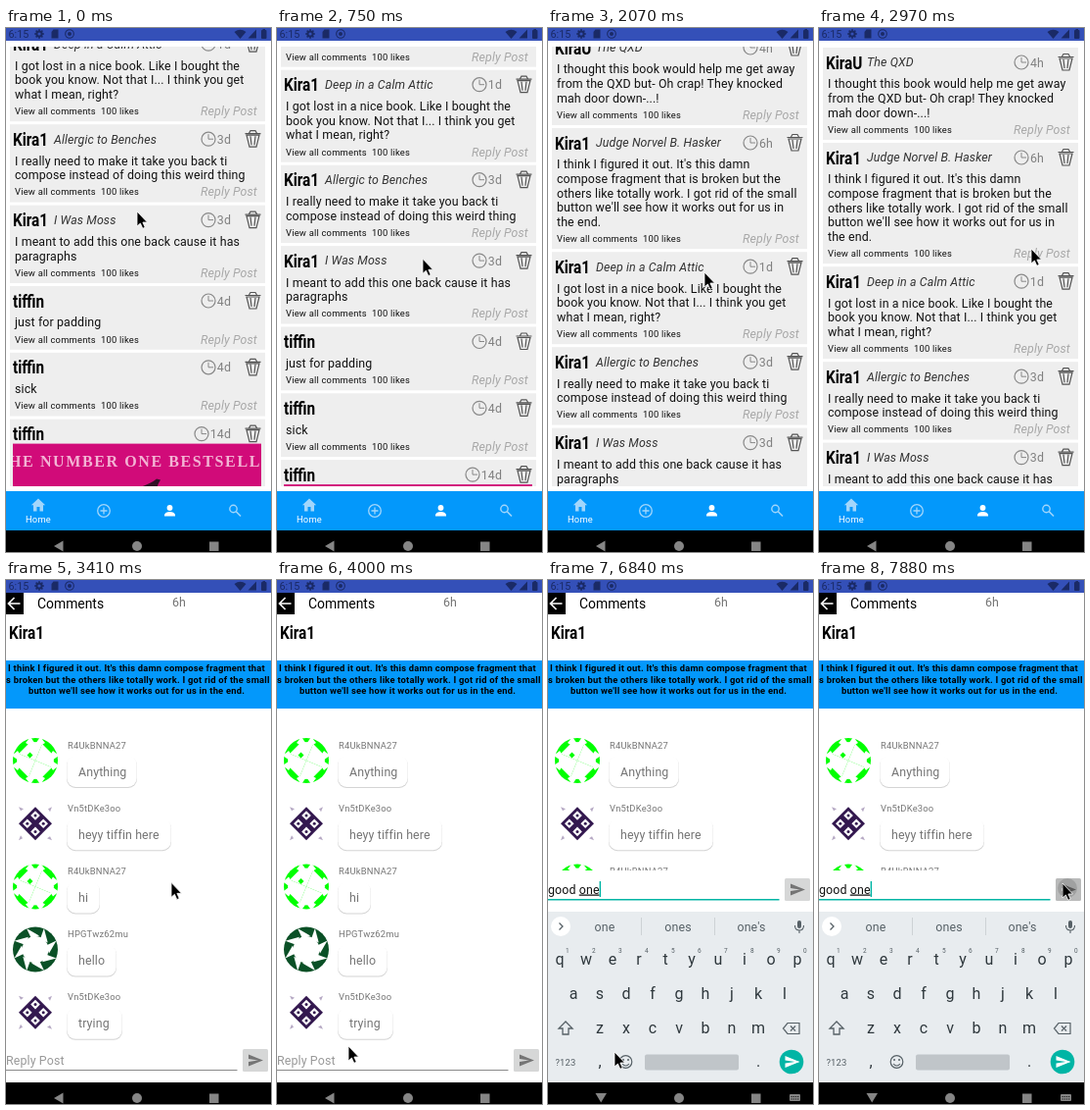
Recreate the animation shown at these times as an HTML page. Size 271 px wide and 534 px high, loop 8000 ms.

```html
<!DOCTYPE html>
<html lang="en">
<head>
<meta charset="utf-8">
<title>Feed and comments</title>
<style>
html, body { margin: 0; height: 100%; overflow: hidden; background: #fff }
svg { display: block; width: 100vw; height: 100vh }
text { font-family: Roboto, sans-serif; white-space: pre }
.body { font-size: 12.4px; letter-spacing: .12px }
.small { font-size: 9.4px; letter-spacing: .21px }
.name { font-size: 18px; font-weight: 700 }
.clock { font-size: 10.8px }
.bar { font-size: 13.9px }
.cover { font: 700 16px 'Liberation Serif', serif; letter-spacing: 1.6px }
.it { font-style: italic }
.bold { font-weight: 700 }
.mid { text-anchor: middle }
.end { text-anchor: end }
.key { font-size: 16px; text-anchor: middle }
.line { fill: none; stroke: currentColor }
</style>
</head>
<body>
<svg id="stage" viewBox="0 0 271 534"></svg>
<script>
const TICK = 148, LAST = 53, DURATION = 8000;
const BLUE = '#0398fb', TEAL = '#00b5a5', GRAY = '#757575';

const text = (x, y, s, cls = 'body', fill = '#111') =>
  `<text x="${x}" y="${y}" class="${cls}" fill="${fill}">${s}</text>`;
const rect = (x, y, w, h, fill, r = 0) =>
  `<rect x="${x}" y="${y}" width="${w}" height="${h}" rx="${r}" fill="${fill}"/>`;
const circle = (x, y, r, fill) => `<circle cx="${x}" cy="${y}" r="${r}" fill="${fill}"/>`;
const path = (d, fill) => `<path d="${d}" fill="${fill}"/>`;
const line = (d, color, w = 1) => `<path d="${d}" class="line" color="${color}" stroke-width="${w}"/>`;
const ring = (x, y, r, color, w = 1) =>
  `<circle cx="${x}" cy="${y}" r="${r}" class="line" color="${color}" stroke-width="${w}"/>`;
const at = (x, y, s, more = '') => `<g transform="translate(${x} ${y}) ${more}">${s}</g>`;
const group = (id, s, attrs = '') => `<g id="${id}" ${attrs}>${s}</g>`;
const clip = (id, x, y, w, h) => `<clipPath id="${id}"><rect x="${x}" y="${y}" width="${w}" height="${h}"/></clipPath>`;
const condensed = (x, y, s) => at(x, y, text(0, 0, s, 'name', '#000'), 'scale(.85 1)');
const spin = (count, s) => Array.from({ length: count }, (_, i) =>
  `<g transform="rotate(${i * 360 / count})">${s}</g>`).join('');
const magnifier = (x, y, color, w) =>
  at(x, y, ring(-1.5, -1.5, 3.7, color, w) + line('M1.3 1.3L6 6', color, w + .2));
const plane = (x, y, color) => at(x, y, path('M-7-6L8 0L-7 6V1.4L3 0L-7-1.4Z', color));

// Feed
const posts = [
  ['KiraU', 'The QXD', '4h', 'I thought this book would help me get away', 'from the QXD but- Oh crap! They knocked', 'mah door down-...!'],
  ['Kira1', 'Judge Norvel B. Hasker', '6h', "I think I figured it out. It's this damn", 'compose fragment that is broken but the',
    'others like totally work. I got rid of the small', "button we'll see how it works out for us in", 'the end.'],
  ['Kira1', 'Deep in a Calm Attic', '1d', 'I got lost in a nice book. Like I bought the', 'book you know. Not that I... I think you get', 'what I mean, right?'],
  ['Kira1', 'Allergic to Benches', '3d', 'I really need to make it take you back ti', 'compose instead of doing this weird thing'],
  ['Kira1', 'I Was Moss', '3d', 'I meant to add this one back cause it has', 'paragraphs'],
  ['tiffin', '', '4d', 'just for padding'],
  ['tiffin', '', '4d', 'sick'],
  ['tiffin', '', '14d'],
];
const trash = line('M-8-5.5H8M-4-6L-2.5-8.5H2.5L4-6M-6.5-4L-3.5 8H3.5L6.5-4ZM-2.5-3L-1.5 6M2.5-3L1.5 6', '#555', 1.2);

function post(y, [name, title, age, ...lines], height) {
  const clockX = age.length > 2 ? 200 : 207;
  let s = rect(4, y - 15, 261, height - 3, '#eee') + condensed(7, y + 6.5, name) +
    text(49, y + 4.3, title, 'body it', '#333') +
    ring(clockX, y, 7, '#888', 1.2) + line(`M${clockX} ${y - 5}v5h5`, '#888') +
    text(230, y + 4.5, age, 'body end', '#808080') + at(252.5, y, trash);
  if (!lines.length) {
    return s + rect(7, y + 10, 254, 90, '#d10b79') +
      `<g clip-path="url(#coverArea)">${text(3, y + 33.5, 'HE NUMBER ONE BESTSELLER', 'cover', '#f3b4d4')}</g>` +
      path(`M138 ${y + 54}q10-3 16-8l4 1q-4 6-4 12z`, '#321026');
  }
  lines.forEach((l, i) => s += text(9, y + 26.4 + 14.6 * i, l));
  const foot = y + height - 25.2;
  return s + text(9, foot, 'View all comments', 'small') + text(97, foot, '100 likes', 'small') +
    text(199, foot + 1, 'Reply Post', 'body it', '#a8a8a8');
}
let headY = 35;
const feedList = posts.map(p => {
  const height = p.length > 3 ? 53.2 + 14.6 * (p.length - 3) : 160;
  const s = post(headY, p, height);
  headY += height;
  return s;
}).join('');

const pale = '#a2d6fb';
const tabs = rect(0, 472, 271, 40, BLUE) +
  path('M33 479.500L25.800 486.300H28V492.500H31.500V488H34.500V492.500H38V486.300H40.200Z', pale) +
  text(33, 504, 'Home', 'small mid', '#fff') +
  ring(100, 492, 6.3, pale, 1.3) + line('M96.500 492h7M100 488.500v7', pale, 1.3) +
  circle(167.5, 489, 2.9, '#fff') + path('M162 497.500v-1.500q1-3 5.500-3t5.500 3v1.500z', '#fff') +
  magnifier(234, 491.5, pale, 1.4);

// Comments
const green = '#0f0', violet = '#33184f', forest = '#0a5026';
const avatars = {
  burst: circle(0, 0, 23, green) +
    spin(4, path('M0 0L-17-7L-7-17L0-19L7-17Z', '#fff') + path('M-10-18L-5-24L0-17L5-24L10-18L0-12Z', '#fff') +
      path('M5.500-8.500L8.500-5.500L5.500-2.500L2.500-5.500Z', green)),
  weave: path('M0-17L17 0L0 17L-17 0Z', violet) +
    spin(4, path('M0-13L4.800-8.200L0-3.400L-4.800-8.200Z', '#fff') + circle(0, -8.2, 1.5, violet) +
      path('M-17-17l5 2-3 2z', '#b6a9c4')),
  wheel: circle(0, 0, 23, forest) + circle(0, 0, 13.5, '#fff') +
    spin(8, path('M-9-21.500L4-14L-4-11Z', '#fff')),
};
const replies = [
  ['burst', 'R4UkBNNA27', 'Anything', 72], ['weave', 'Vn5tDKe3oo', 'heyy tiffin here', 107],
  ['burst', 'R4UkBNNA27', 'hi', 34], ['wheel', 'HPGTwz62mu', 'hello', 51], ['weave', 'Vn5tDKe3oo', 'trying', 57],
];
const replyList = replies.map(([avatar, user, words, w], i) => at(0, 184 + 64.2 * i,
  at(30, 0, avatars[avatar]) + text(63, -12.5, user, 'small', GRAY) +
  rect(62, -4, w, 32, '#d4d4d4', 9) + rect(62.3, -5, w - .6, 32, '#fff', 9) +
  text(74, 15.5, words, 'body', GRAY))).join('');

const commentsTop = rect(0, 13, 271, 499, '#fff') + rect(0, 13, 18, 22, '#000') +
  line('M14.500 24H2.500M8.500 18L2.500 24L8.500 30', '#fff', 1.7) +
  text(32, 28.5, 'Comments', 'bar', '#000') + text(170, 27, '6h', 'body', GRAY) +
  condensed(3, 60, 'Kira1') + rect(0, 82, 271, 49, BLUE) +
  ["I think I figured it out. It's this damn compose fragment that",
    'is broken but the others like totally work. I got rid of the small',
    "button we'll see how it works out for us in the end."]
    .map((l, i) => text(133.5, 93.3 + 11.4 * i, l, 'small bold mid', '#000')).join('');

const entry = group('hint', text(0, 493.5, 'Reply Post', 'body', '#999')) +
  '<text id="typed" y="493.500" class="body" fill="#111"></text>' +
  '<rect id="underline" y="499" width="236.500"/>' +
  `<rect id="caret" y="481" width="1.500" height="16" fill="${TEAL}"/>` +
  rect(242, 478, 26, 23, '#d6d7d7', 1.5) + plane(255, 489.5, GRAY) +
  group('press', rect(242, 478, 26, 23, '#0002', 1.5) + circle(254, 488, 10, '#0002'));

// Keyboard
const ink = '#566066', keyInk = '#2f383d';
const letters = (row, x0, y) => [...row].map((c, i) => text(x0 + 27 * i, y, c, 'key', keyInk)).join('');
const tools = line('M15 349.500L11.500 353L15 356.500', ink, 1.3) + magnifier(50, 353, ink, 1.4) +
  line('M84.500 348.500h10v6l-4 4h-6zM87 353q2.500 4 5 0', ink, 1.3) +
  text(129, 356.5, 'GIF', 'small bold mid', ink) + rect(164, 348, 11, 11, ink, 1) +
  [214.5, 218.5, 222.5].map(x => circle(x, 353, 1.2, ink)).join('');
const suggestions = line('M11.500 349.500L15 353L11.500 356.500', ink, 1.3) +
  line('M95.500 344v18M170.500 344v18', '#cdd2d5') +
  [58, 133, 208].map(x => text(x, 357.5, '', 'word body mid', ink)).join('');
const keyboard = rect(0, 338, 271, 176, '#e8ecef') + circle(13, 353, 10, '#fff') +
  group('tools', tools) + group('suggestions', suggestions) +
  rect(255, 347, 4, 8, ink, 2) + line('M252.500 352q0 5 4.500 5t4.500-5M257 357v3', ink, 1.1) +
  letters('qwertyuiop', 12, 391.5) + letters('asdfghjkl', 26, 426.5) + letters('zxcvbnm', 53, 461.5) +
  [...'1234567890'].map((c, i) => `<text x="${18 + 27 * i}" y="380" font-size="6.500" fill="${ink}">${c}</text>`).join('') +
  line('M18 450L11 457H15V463H21V457H25Z', ink, 1.3) +
  line('M245 451.500H257V462.500H245L240.500 457ZM248 454.500l5 5M253 454.500l-5 5', ink, 1.2) +
  text(18, 495, '?123', 'small mid', ink) + text(53, 496, ',', 'key', keyInk) + text(215, 496, '.', 'key', keyInk) +
  ring(79.5, 491, 6.3, ink, 1.2) + circle(77, 489, 1, ink) + circle(82, 489, 1, ink) +
  line('M76 493q3.500 4 7 0', ink, 1.1) + rect(99, 483.5, 96, 16, '#c0c5c9', 2) +
  circle(249, 491, 12.3, TEAL) + plane(249.5, 491, '#fff');

// System bars
const dark = '#1a2a66', soft = '#858585';
const statusBar = rect(0, 0, 271, 13, '#3450b8') + text(2.5, 9.5, '6:15', 'clock', dark) +
  at(34, 6, ring(0, 0, 2.6, dark, 2) + spin(8, rect(-.8, -4.8, 1.6, 2, dark))) +
  path('M46.500 4L48.500 1.500H53.500V10.500H46.500Z', dark) + ring(65, 6, 4.3, dark, 1.1) + circle(65, 6, 2, dark) +
  path('M233.500 4Q239.500-.5 245.500 4L239.500 11Z', dark) + path('M256 1.500V10.500H247.500Z', dark) +
  rect(261, 2, 5.5, 9, dark, 1) + rect(262.5, 1, 2.5, 2, dark);
const navBar = rect(0, 512, 271, 22, '#000') + circle(134, 528, 5, soft) + rect(208, 523.5, 9.5, 9.5, soft) +
  group('back', path('M49 528L58.500 522.500V533.500Z', soft)) +
  group('down', path('M48.500 523H60L54.200 532.500Z', soft) + rect(247, 524, 11, 7, soft, 1) +
    group('dots', line('M248.500 526.500h8M248.500 529h8', '#000', .8), 'stroke-dasharray="1.200 1"'));

const $ = id => document.getElementById(id);
$('stage').innerHTML = '<defs>' + clip('feedArea', 0, 19, 271, 448) + clip('listArea', 0, 140, 271, 330) +
  clip('listShort', 0, 140, 271, 156) + clip('coverArea', 7, 0, 254, 900) + '</defs>' +
  rect(0, 0, 271, 534, '#fff') +
  group('feedPage', group('feedClip', group('feed', feedList), 'clip-path="url(#feedArea)"') + tabs) +
  group('commentsPage', commentsTop + group('replies', replyList) + group('entry', entry) + group('keyboard', keyboard)) +
  statusBar + navBar +
  group('cursor', '<path d="M0 0V15L3.400 12L5.800 17.300L8.200 16.200L5.900 11H10.500Z" fill="#000" stroke="#fff" stroke-width=".8"/>');

// Motion, keyed in ticks
const scrollKeys = [[2, 242], [4, 222], [6, 179], [8, 115], [10, 65], [13, 15], [15, 0]];
const slideKeys = [[29, 174], [31, 0]];
const cursorKeys = [[0, 134, 187], [1, 134, 188], [2, 134, 188], [6, 154, 251], [10, 156, 251], [13, 160, 249],
  [17, 217, 225], [21, 217, 225], [27, 73, 475], [28, 68, 481], [47, 68, 481], [52, 249, 309]];
// tick, finished text, composing word, three suggestions
const typing = [
  [38, '', 'go', 'go', 'going', 'got'], [39, '', 'goo', 'goo', 'good', 'goof'],
  [40, '', 'good', 'good', 'goods', 'goodness'], [41, 'good ', '', 'morning', 'luck', 'night'],
  [44, 'good ', 'o', 'o', 'one', 'on'], [45, 'good ', 'on', 'on', 'one', 'only'],
  [46, 'good ', 'one', 'one', 'ones', "one's"],
];

function tween(keys, n) {
  const i = keys.findIndex(k => k[0] > n);
  if (i < 1) return keys[i ? keys.length - 1 : 0].slice(1);
  const [a, b] = [keys[i - 1], keys[i]], p = (n - a[0]) / (b[0] - a[0]);
  return a.slice(1).map((v, j) => v + (b[j + 1] - v) * p);
}
const move = (id, x, y) => $(id).setAttribute('transform', `translate(${x} ${y})`);
const show = (id, on) => $(id).style.display = on ? '' : 'none';
const words = document.querySelectorAll('.word');

function draw(n) {
  const inComments = n >= 22, focused = n >= 29, raised = n >= 30;
  show('feedPage', !inComments);
  show('commentsPage', inComments);
  move('feed', 0, -tween(scrollKeys, n)[0]);
  move('cursor', ...tween(cursorKeys, n));
  move('keyboard', 0, tween(slideKeys, n)[0]);
  show('keyboard', raised);
  move('entry', 0, raised ? -174 : 0);
  $('replies').setAttribute('clip-path', `url(#${raised ? 'listShort' : 'listArea'})`);
  show('back', !raised);
  show('down', raised);
  $('underline').setAttribute('fill', focused ? TEAL : '#8a8a8a');
  $('underline').setAttribute('height', focused ? 1.5 : 1);

  const state = typing.filter(k => k[0] <= n).pop();
  const [, done = '', composing = '', ...offers] = state || [];
  show('hint', !state);
  show('tools', !state);
  show('suggestions', state);
  $('typed').innerHTML = `${done}<tspan text-decoration="underline">${composing}</tspan>`;
  words.forEach((w, i) => w.textContent = offers[i] || '');
  show('caret', focused && !(n >= 33 && n < 36) && !(n >= 50 && n < 53));
  $('caret').setAttribute('x', state ? $('typed').getComputedTextLength() : 0);
  show('press', n >= 53);
}

let shown = -1;
function frame() {
  const n = Math.min(LAST, Math.floor(performance.now() % DURATION / TICK));
  if (n !== shown) draw(shown = n);
  requestAnimationFrame(frame);
}
frame();
</script>
</body>
</html>
```
